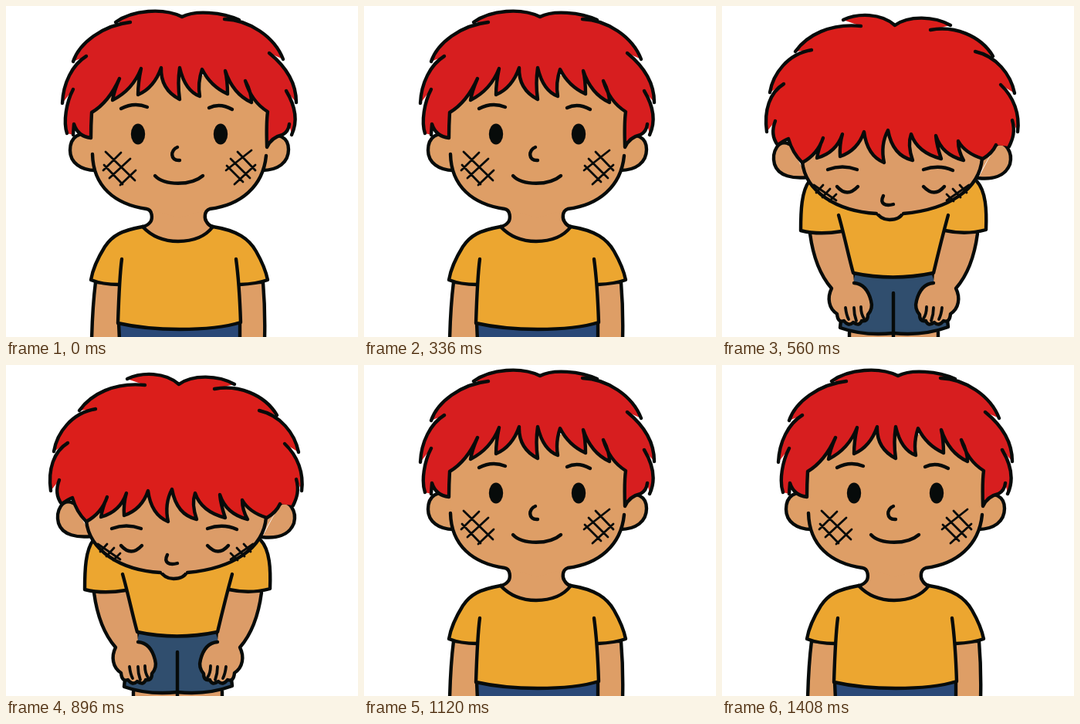
Recreate the animation shown at these times as an HTML page. Size 456 px wide and 429 px high, loop 1.6 s.

```html
<!DOCTYPE html>
<html lang="en">
<head>
<meta charset="utf-8">
<title>Bowing boy</title>
<style>
html, body { margin: 0; width: 100%; height: 100%; overflow: hidden; background: #fff; }
svg { display: block; width: 456px; height: 429px; }
path { stroke-linecap: round; stroke-linejoin: round; }
</style>
</head>
<body>
<svg viewBox="0 0 456 429"><g id="stand"></g><g id="bow"></g></svg>
<script>
const LINE = '#070b0a', SHIRT = '#eca630';

const fill = (color, d) => `<path d="${d}" fill="${color}"/>`;
const line = (d, w = 4.4) => `<path d="${d}" fill="none" stroke="${LINE}" stroke-width="${w}"/>`;
const shape = (color, d) => fill(color, d) + line(d);
const eye = x => `<ellipse cx="${x}" cy="166" rx="9.2" ry="13.5" fill="${LINE}"/>`;
const mirror = (art, axis) => `<g transform="translate(${2 * axis} 0) scale(-1 1)">${art}</g>`;

// Fringe runs left to right; the overlapping locks run back over the top.
const hairdo = (color, fringe, locks) =>
  fill(color, fringe + 'L' + locks.join('L') + 'Z') + line(fringe + 'M' + locks.join('M'));

function drawStand() {
  const skin = '#de9e66', pants = '#2a4877';
  const body =
    fill(pants, 'M146 408H304V432H146Z') +
    shape(skin, 'M116 358Q112 390 111 433H147L146 411L149 358Z') +
    shape(skin, 'M333 358Q336 395 335 433H303V411L300 358Z') +
    fill(skin, 'M184 258C191 268 190 279 176 287L200 312H245L269 287C256 280 255 268 264 258Z') +
    fill(SHIRT, 'M177 286C150 291 138 297 128 312C118 328 112 343 110 355Q125 361 146 361L145 411Q180 419 225 419Q275 419 304 410L302 361Q325 360 339 355C337 345 332 332 324 318C315 302 300 291 268 286C258 299 243 305 223 305C205 305 190 300 177 286Z') +
    line('M177 286C150 291 138 297 128 312C118 328 112 343 110 355Q125 361 146 361') +
    line('M268 286C300 291 315 302 324 318C332 332 337 345 339 355Q325 360 303 361') +
    line('M150 328C147 350 146 380 145 411Q180 419 225 419Q275 419 304 410C303 380 301 350 298 328') +
    line('M177 286C190 300 205 305 223 305C243 305 258 299 268 286');
  const head =
    shape(skin, 'M112 169C95 161 83 170 83 187C83 203 97 213 116 213') +
    shape(skin, 'M338 172C352 163 366 170 366 186C366 203 352 213 332 213') +
    fill(skin, 'M111 90H338L337 190C335 232 306 256 262 264L225 275L186 264C137 257 111 230 112 190Z') +
    line('M112 192C113 234 141 257 182 263C190 264 190 276 187 280Q183 285 177 286') +
    line('M337 194C333 234 304 258 264 263C256 266 257 276 260 280Q263 285 268 286');
  const hair = hairdo('#d71e1f',
    'M87 167L88 153Q93 169 110 171Q110 155 111 138Q133 125 147 94Q140 110 138 122Q164 109 175 81Q171 100 171 115Q192 106 201 80Q200 108 225 121Q222 100 225 80Q232 110 251 117Q248 100 254 82Q265 104 287 114Q287 97 284 84Q294 114 318 125Q318 112 310 97Q318 124 339 137Q337 151 338 183Q344 170 358 167Q366 163 367 153',
    ['370 167C378 150 375 130 363 110',
     '376 125C376 100 362 78 341 61',
     '359 69C348 40 315 18 283 17',
     '302 18C280 8 245 5 228 14C204 2 164 5 142 21',
     '161 21C125 25 95 48 87 72',
     '104 65C86 76 74 100 73 126',
     '87 108C78 125 74 150 79 165']);
  const marks = line(
    'M129 189L167 226M127 206L151 231' +
    'M126 213L149 190M134 223L161 198M148 232L168 213' +
    'M285 213L318 187M296 231L323 206' +
    'M300 189L323 213M291 198L316 223M286 207L307 228', 2.8);
  const face =
    line('M149 133Q166 124 183 131') + line('M263 132Q277 125 293 134') +
    eye(171) + eye(278) +
    line('M222 183C213 186 212 201 225 200') +
    line('M193 220C205 233 240 233 255 220');
  return body + head + hair + marks + face;
}

function drawBow() {
  const skin = '#dc9c68', pants = '#304e6e';
  const armEdge = 'M114 295C118 325 128 350 142 366C136 378 138 392 149 399Q150 411 158 408Q164 416 170 410Q178 416 181 408Q189 410 189 400Q196 392 193 382C190 370 184 360 171 359';
  const arm =
    fill(skin, armEdge + 'L170 346L155 288Z') + line(armEdge) +
    line('M160 391Q161 400 164 406M171 391Q171 400 174 408M180 390Q180 399 184 405', 3.8);
  const legs =
    fill(skin, 'M165 418H280V432H165Z') +
    line('M165 423V433M222 423V433M280 423V433') +
    shape(pants, 'M172 342H272C280 365 291 390 293 416Q260 428 222 424Q184 428 153 417C155 390 166 365 172 342Z') +
    line('M222 372V423');
  const shirt =
    fill(SHIRT, 'M113 225C103 240 102 265 102 291Q125 297 155 292L170 346Q221 357 274 346L289 291Q316 297 342 290C343 265 342 240 330 225Z') +
    line('M113 227C103 240 102 265 102 291Q125 297 155 292') +
    line('M330 227C342 240 343 265 342 290Q316 297 289 291') +
    line('M151 271C158 295 164 325 170 346Q221 357 274 346C279 325 285 300 293 271');
  const head =
    fill(skin, 'M86 172L112 222L104 160ZM356 178L330 224V180Z') +
    shape(skin, 'M87 179C73 172 64 189 68 205C73 221 93 224 111 222') +
    shape(skin, 'M355 180C367 173 377 190 373 205C367 221 350 225 332 223') +
    shape(skin, 'M199 266Q205 277 217 277Q231 277 235 267') +
    fill(skin, 'M104 150H338V194C335 236 293 263 235 269H200C148 266 107 240 104 200Z') +
    line('M104 202C108 240 148 266 200 269M235 269C293 264 334 238 337 197');
  const hair = hairdo('#db1e1b',
    'M72 180Q81 174 86 172Q91 190 104 203Q124 192 131 171Q125 185 123 197Q148 190 156 166Q152 180 153 195Q176 187 184 163Q188 194 210 203Q205 180 215 161Q221 194 247 200Q240 180 245 166Q253 190 284 198Q278 180 277 168Q285 193 313 200Q306 188 306 175Q315 191 338 198Q350 191 355 180',
    ['372 182C377 172 380 162 376 148',
     '383 163C386 140 378 118 361 102',
     '379 113C374 88 355 65 328 59',
     '351 65C335 38 300 25 270 31',
     '296 25C275 13 242 12 224 25C206 9 176 9 157 18',
     '180 26C140 22 110 38 95 59',
     '116 57C85 62 66 88 62 112',
     '80 101C62 112 54 135 58 163',
     '69 149C64 162 66 172 72 180']);
  const scar = line('M119 232L148 252M122 242L131 232M130 248L140 237M139 253L148 244', 2.8);
  const face =
    line('M137 212Q156 205 175 212') + line('M261 212Q281 205 299 213') +
    line('M149 234Q162 249 176 234') + line('M261 234Q275 249 288 234') +
    line('M209 246C204 256 211 260 222 257');
  return legs + arm + mirror(arm, 222.5) + shirt + head + scar + mirror(scar, 219.5) + hair + face;
}

const stand = document.getElementById('stand');
const bow = document.getElementById('bow');
stand.innerHTML = drawStand();
bow.innerHTML = drawBow();

const start = performance.now();
function update(now) {
  const t = Math.max(0, now - start) % 1600;
  const bowing = t >= 560 && t < 1120;
  stand.style.display = bowing ? 'none' : '';
  bow.style.display = bowing ? '' : 'none';
  requestAnimationFrame(update);
}
update(start);
</script>
</body>
</html>
```
